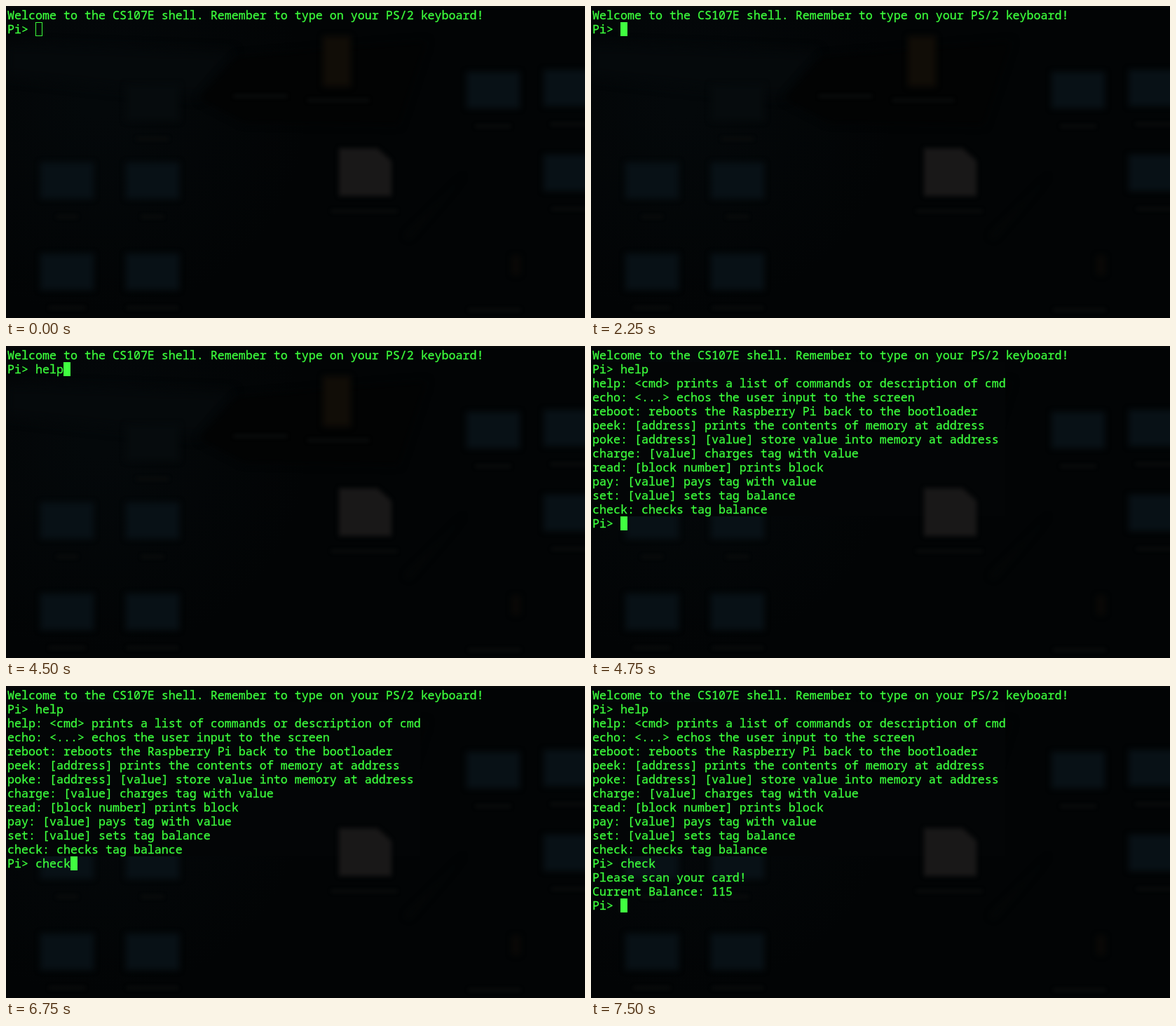
Recreate the animation shown at these times as an HTML page with a canvas. Size 826 by 445 pixels, loop 8 s.

```html
<!DOCTYPE html>
<html lang="en">
<head>
<meta charset="utf-8">
<title>Shell session</title>
<style>
html, body { margin: 0; width: 100%; height: 100%; overflow: hidden; background: #020405; }
canvas { display: block; }
</style>
</head>
<body>
<canvas id="stage" width="826" height="445"></canvas>
<script>
const W = 826, H = 445, LOOP = 8000;
const CELL = 10, ROW = 20, LEFT = 2, TOP = 3, BASE = 16;
const GREEN = '#3cff3c', BACK = '#020405';
const FOCUS_AT = 1250, HELP_AT = 4750;
const ctx = document.getElementById('stage').getContext('2d');

const INTRO = `Welcome to the CS107E shell. Remember to type on your PS/2 keyboard!
Pi> `;
const HELP = `
help: <cmd> prints a list of commands or description of cmd
echo: <...> echos the user input to the screen
reboot: reboots the Raspberry Pi back to the bootloader
peek: [address] prints the contents of memory at address
poke: [address] [value] store value into memory at address
charge: [value] charges tag with value
read: [block number] prints block
pay: [value] pays tag with value
set: [value] sets tag balance
check: checks tag balance
Pi> `;

// Text added to the terminal over time
const script = [
  { at: 750, add: '' },
  { at: 3500, add: 'h' },
  { at: 4250, add: 'e' },
  { at: 4500, add: 'lp' },
  { at: HELP_AT, add: HELP },
  { at: 6250, add: 'che' },
  { at: 6500, add: 'c' },
  { at: 6750, add: 'k' },
  { at: 7000, add: '\nPlease scan your card!\n' },
  { at: 7500, add: 'Current Balance: 115\nPi> ' }
];

// The cursor stays lit for a second after activity, then blinks
function isLit(idle) {
  return idle < 1000 || Math.floor(idle / 500) % 2 === 1;
}

function seeded(seed) {
  return () => (seed = (seed * 16807) % 2147483647) / 2147483647;
}

function makeLayer(paint) {
  const layer = document.createElement('canvas');
  layer.width = W;
  layer.height = H;
  paint(layer.getContext('2d'));
  return layer;
}

function blob(g, color, blur, points) {
  g.filter = `blur(${blur}px)`;
  g.fillStyle = color;
  g.beginPath();
  points.forEach(([x, y]) => g.lineTo(x, y));
  g.fill();
}

function box(g, color, blur, x, y, w, h) {
  blob(g, color, blur, [[x, y], [x + w, y], [x + w, y + h], [x, y + h]]);
}

function label(g, cx, y, w) {
  box(g, '#090b0b', 2.5, cx - w / 2, y, w, 5);
}

// Blurred desktop showing through the terminal
function paintDesktop(g) {
  const random = seeded(11);
  g.fillStyle = BACK;
  g.fillRect(0, 0, W, H);
  const glow = g.createRadialGradient(130, 140, 20, 130, 140, 300);
  glow.addColorStop(0, '#04080a');
  glow.addColorStop(1, BACK);
  g.fillStyle = glow;
  g.fillRect(0, 0, W, H);
  blob(g, '#05090b', 8, [[0, 55], [325, 66], [276, 130], [0, 100]]);
  blob(g, '#020303', 6, [[275, 132], [330, 72], [600, 50], [560, 170], [340, 166]]);
  blob(g, '#050707', 5, [[655, 240], [575, 332], [568, 328], [622, 275]]);
  box(g, '#0a0b0b', 1.5, 0, -3, W, 5);

  const columns = { 49: [223, 353], 171: [112, 223, 353], 657: [94], 767: [91, 212] };
  for (const x in columns) {
    for (const y of columns[x]) {
      box(g, y < 120 && x < 200 ? '#060b0d' : '#081116', 4, +x, y, 76, 52);
      label(g, +x + 38, y + 75, 30 + 50 * random());
    }
  }
  box(g, '#110d07', 4, 452, 43, 40, 72);
  box(g, '#0b0906', 4, 722, 356, 11, 27);
  label(g, 363, 126, 76);
  label(g, 474, 132, 88);
  label(g, 697, 431, 74);
}

function paintFile(g) {
  blob(g, '#191818', 3, [[475, 203], [530, 203], [550, 221], [550, 271], [475, 271]]);
  label(g, 511, 290, 94);
}

const desktop = makeLayer(paintDesktop);
const file = makeLayer(paintFile);

function drawPointer(x, y) {
  ctx.beginPath();
  [[0.5, 0.5], [0.5, 15], [4, 12], [7, 17.5], [9, 16.5], [7, 11], [11.5, 11]]
    .forEach(([dx, dy]) => ctx.lineTo(x + dx, y + dy));
  ctx.closePath();
  ctx.fillStyle = '#000';
  ctx.fill();
  ctx.strokeStyle = '#bbb';
  ctx.lineWidth = 1;
  ctx.stroke();
}

function drawCursor(row, col, focused) {
  const x = LEFT + col * CELL, y = TOP + row * ROW;
  if (focused) {
    ctx.fillStyle = '#40ff40';
    ctx.fillRect(x, y, CELL, ROW);
  } else {
    ctx.strokeStyle = GREEN;
    ctx.lineWidth = 1;
    ctx.strokeRect(x + 0.5, y + 0.5, CELL - 1, ROW - 1);
  }
}

function drawText(lines) {
  ctx.font = '16.667px "Noto Sans Mono", "DejaVu Sans Mono", monospace';
  ctx.fillStyle = ctx.strokeStyle = GREEN;
  ctx.lineWidth = 0.3;
  lines.forEach((line, row) => {
    const y = TOP + row * ROW + BASE;
    ctx.fillText(line, LEFT, y);
    ctx.strokeText(line, LEFT, y);
  });
}

function draw(t) {
  const past = script.filter(step => t >= step.at);
  const lines = (INTRO + past.map(step => step.add).join('')).split('\n');
  const lastActive = past.length ? past[past.length - 1].at : 0;

  ctx.drawImage(desktop, 0, 0);
  if (t >= HELP_AT) {
    ctx.fillStyle = '#030506';
    ctx.fillRect(0, 23, 591, 220);
  }
  ctx.drawImage(file, 0, 0);
  if (t >= 750 && t < 1000) drawPointer(796, 38);

  drawText(lines);
  const row = lines.length - 1;
  if (isLit(t - lastActive)) drawCursor(row, lines[row].length, t >= FOCUS_AT);
}

function tick() {
  draw(performance.now() % LOOP);
  requestAnimationFrame(tick);
}
tick();
</script>
</body>
</html>
```
